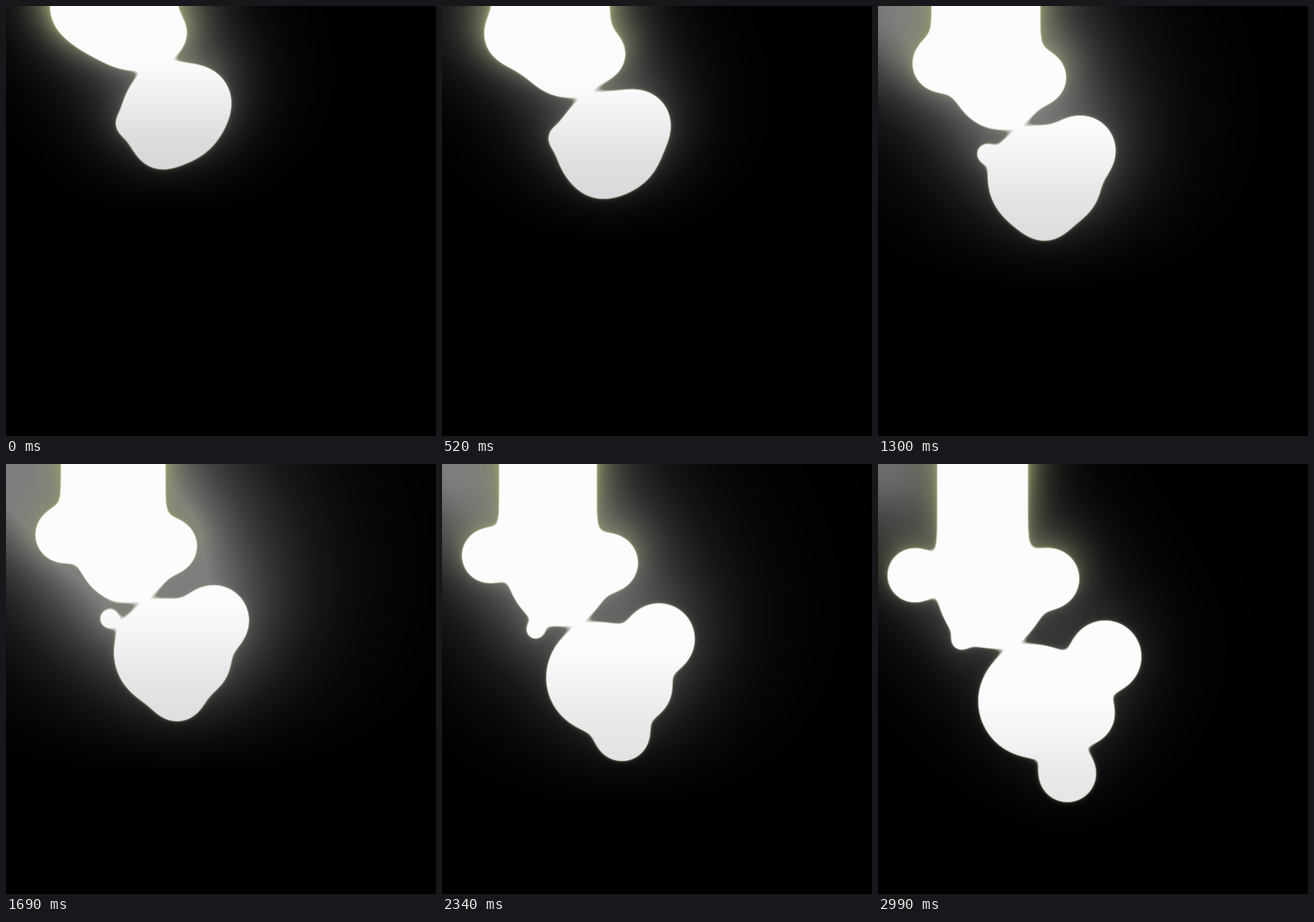
An HTML page with a canvas for the animation above (3120 ms loop, 512x512 px).

```html
<!DOCTYPE html>
<html lang="en">
<head>
<meta charset="utf-8">
<title>Growing cloud</title>
<style>
  html, body { margin: 0; height: 100%; overflow: hidden; background: #000; }
  canvas { display: block; width: 100vw; height: 100vh; }
</style>
</head>
<body>
<canvas width="512" height="512"></canvas>
<script>
const SIZE = 512, STEP = 130, STEPS = 24;
const MELT = 7;           // how softly neighbouring lobes merge
const OLIVE = [150, 155, 105];
const ctx = document.querySelector('canvas').getContext('2d');

// Each lobe is a circle [x, y, radius] that sinks and swells from one place to another.
const lobes = {
  neck:          { from: [130, -10, 75], to: [124, 105, 56] },
  leftShoulder:  { from: [90, 3, 36],    to: [43, 132, 34] },
  rightShoulder: { from: [186, 32, 30],  to: [203, 136, 38] },
  chest:         { from: [148, 30, 46],  to: [135, 155, 65] },
  knob:          { from: [144, 140, 13], to: [98, 210, 11] },
  bulge:         { from: [226, 113, 42], to: [270, 229, 45] },
  belly:         { from: [197, 128, 61], to: [186, 282, 69] },
  hip:           { from: [212, 130, 41], to: [245, 297, 38] },
  finger:        { from: [184, 163, 30], to: [225, 368, 36], pace: 1.08 }
};

const mix = (a, b, k) => a + (b - a) * k;
const clamp = v => Math.max(0, Math.min(1, v));
const smooth = v => { v = clamp(v); return v * v * (3 - 2 * v); };

function place({ from, to, pace = .82 }, u) {
  return [
    mix(from[0], to[0], u ** 1.3),
    mix(from[1], to[1], u ** pace),
    mix(from[2], to[2], u)
  ];
}

function render(u) {
  const image = ctx.createImageData(SIZE, SIZE);
  const [neck, ...circles] = Object.values(lobes).map(lobe => place(lobe, u));
  const [, fingerY, fingerR] = circles[circles.length - 1];
  const tip = fingerY + fingerR;

  const swell = Math.exp(-(((u - .62) / .2) ** 2));
  const reach = mix(32, 60, swell);
  const strength = mix(38, 56, swell);
  const haze = 100 * clamp(u * 3 - .4);
  const shadeStart = mix(.25, .65, u), shadeDepth = mix(36, 22, u);

  let out = 0;
  for (let y = 0; y < SIZE; y++) {
    const fall = clamp(1 - y / (tip + 70));
    const oliveFall = .8 * clamp(1 - y / (tip * .45));
    const body = 252 - shadeDepth * smooth((y / tip - shadeStart) / (1 - shadeStart));

    for (let x = 0; x < SIZE; x++) {
      let near = 0, wide = 0;
      const add = d => {
        if (d < 80) near += Math.exp(-d / MELT);
        wide += Math.exp(-Math.max(0, d) / reach);
      };
      add(Math.hypot(x - neck[0], Math.max(0, y - neck[1])) - neck[2]);
      for (const [cx, cy, r] of circles) {
        const dx = x - cx, dy = y - cy;
        add(Math.sqrt(dx * dx + dy * dy) - r);
      }
      const distance = 2 - MELT * Math.log(near);
      const outside = Math.max(0, distance);

      const corner = haze * Math.exp(-(x * x + y * y) / 6400);
      const glow = Math.min(125, strength * wide * fall + corner);
      const olive = Math.min(.9, oliveFall * Math.exp(-outside / 15) + .45 * Math.exp(-outside / 1.5));
      const cover = clamp(.6 - distance / 1.6);
      for (const tint of OLIVE) {
        image.data[out++] = mix(mix(glow, tint, olive), body, cover);
      }
      image.data[out++] = 255;
    }
  }
  return image;
}

const frames = [];
let shown = -1;

function tick() {
  const step = Math.floor(performance.now() / STEP) % STEPS;
  if (step !== shown) {
    frames[step] ??= render(step / (STEPS - 1));
    ctx.putImageData(frames[step], 0, 0);
    shown = step;
  }
  requestAnimationFrame(tick);
}
tick();
</script>
</body>
</html>
```
